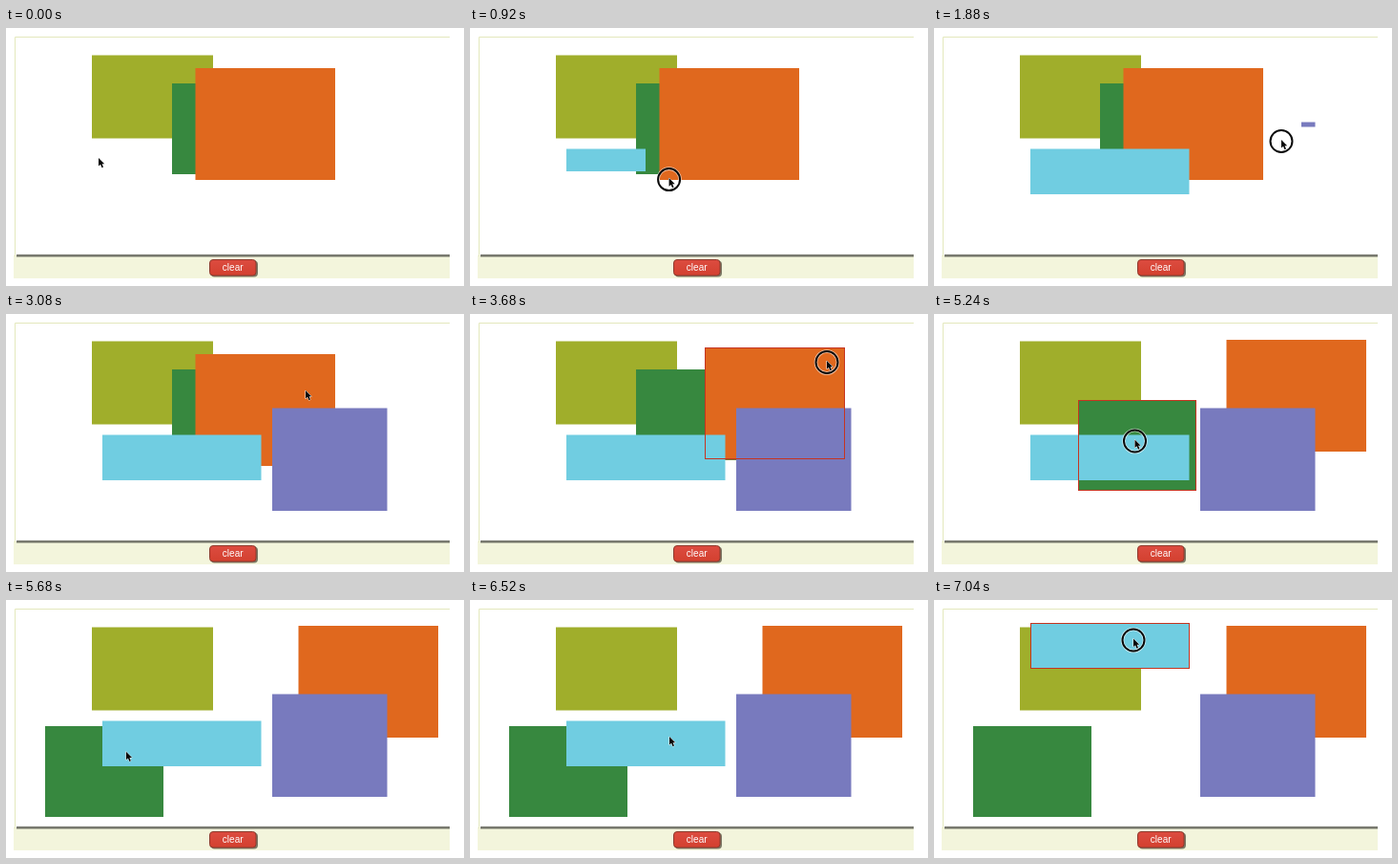
Write an HTML page that moves like this. It is 480 px wide and 270 px high and loops after 7.6 s.

```html
<!DOCTYPE html>
<html lang="en">
<head>
<meta charset="utf-8">
<title>Drawing boxes</title>
<style>
  html, body { margin: 0; width: 100%; height: 100%; overflow: hidden; background: #fff; }
  svg { display: block; width: 480px; height: 270px; }
  text { font: 10px "Liberation Sans", Arial, sans-serif; fill: #fff; text-anchor: middle; }
</style>
</head>
<body>
<svg viewBox="0 0 480 270">
  <defs>
    <linearGradient id="edge" x2="0" y2="1">
      <stop offset="0" stop-color="#b5b6ac"/>
      <stop offset=".4" stop-color="#55564e"/>
      <stop offset="1" stop-color="#d5d7c0"/>
    </linearGradient>
    <linearGradient id="red" x2="0" y2="1">
      <stop offset="0" stop-color="#dc4c40"/>
      <stop offset="1" stop-color="#d3402f"/>
    </linearGradient>
  </defs>

  <rect x="8" y="238" width="457" height="24" fill="#f3f5dc"/>
  <path d="M9.5 239V9.5H465" fill="none" stroke="#e3e8bd"/>
  <rect x="11" y="236.8" width="454" height="3.2" fill="url(#edge)"/>

  <rect x="214.5" y="243.5" width="49.5" height="17" rx="4" fill="#55503f" opacity=".75"/>
  <rect x="213.5" y="242.5" width="48.5" height="16.5" rx="3.5" fill="url(#red)" stroke="#8c3a2d"/>
  <text x="237.7" y="254">clear</text>

  <g id="boxes"></g>
  <rect id="outline" fill="none" stroke="#c53420"/>
  <g id="pointer">
    <g id="ring" fill="none">
      <circle cy="1.5" r="11.5" stroke="#fff" stroke-width="3.6" opacity=".6"/>
      <circle cy="1.5" r="11.5" stroke="#0a0a0a" stroke-width="2"/>
    </g>
    <path d="M0 0V8.6L2 6.8L3.5 10.2L5 9.5L3.6 6.2H6.2Z" fill="#080808"
      stroke="#fff" stroke-width="1" paint-order="stroke"/>
  </g>
</svg>
<script>
const LOOP = 7600, STEP = 40, LAG = 40;

// Back to front: x, y, width, height, colour
const boxes = {
  olive:  [90, 28.5, 127, 87, '#a0ae2b'],
  green:  [174, 58, 124, 95, '#37883f'],
  orange: [198.5, 42, 146.5, 117, '#e0681e'],
  cyan:   [101, 126.5, 166.5, 47.5, '#70cde1'],
  purple: [279, 98.5, 120.5, 107.5, '#787abe']
};

// Pointer path: time, x, y, easing into this point
const path = [
  [0, 97, 136], [520, 97, 136], [640, 101, 126], [680, 101, 126],
  [1080, 267, 174], [1360, 267, 174], [1680, 399, 99], [1760, 399, 99],
  [1840, 385, 103.5, 'in'], [1880, 364, 117, 'line'], [2240, 279, 206, 'out'],
  [2560, 279, 206], [3080, 314, 80, 'out'], [3280, 309, 58], [3400, 309, 58],
  [3680, 374, 49, 'in'], [4120, 405.5, 44.5, 'out'], [4280, 417, 43],
  [4600, 417, 43], [4960, 256, 85], [5080, 256, 85],
  [5200, 233, 117, 'in'], [5280, 188, 146, 'line'], [5480, 123, 159, 'out'],
  [5640, 123, 159], [5960, 190, 153], [6120, 190, 153], [6480, 209, 143],
  [6640, 209, 143], [6840, 209, 52], [7000, 209, 40.5, 'out'], [LOOP, 209, 40.5]
];

const draws = [
  { name: 'cyan', down: 640, up: 1120, fromX: 0 },
  { name: 'purple', down: 1720, up: 2480, fromX: 1 }
];

// Each drag ends at an exact offset
const drags = [
  { name: 'orange', down: 3320, up: 4600, dx: 108, dy: -15 },
  { name: 'green', down: 5000, up: 5600, dx: -133, dy: 74 },
  { name: 'cyan', down: 6600, up: LOOP, dx: 0, dy: -102.5 }
];

const ease = {
  line: u => u,
  in: u => u * u,
  out: u => u * (2 - u),
  both: u => u * u * (3 - 2 * u)
};

function pointerAt(t) {
  const i = Math.max(1, path.findIndex(p => p[0] >= t));
  const [t0, x0, y0] = path[i - 1];
  const [t1, x1, y1, kind = 'both'] = path[i];
  const u = ease[kind]((t - t0) / (t1 - t0));
  return [x0 + (x1 - x0) * u, y0 + (y1 - y0) * u];
}

const $ = id => document.getElementById(id);
const nodes = {};
for (const [name, box] of Object.entries(boxes)) {
  const node = document.createElementNS('http://www.w3.org/2000/svg', 'rect');
  node.setAttribute('fill', box[4]);
  nodes[name] = $('boxes').appendChild(node);
}

function place(node, x, y, w, h) {
  Object.entries({ x, y, width: Math.max(0, w), height: Math.max(0, h) })
    .forEach(([key, value]) => node.setAttribute(key, value));
}

const show = (node, on) => node.setAttribute('visibility', on ? 'visible' : 'hidden');
const held = t => a => t >= a.down && t < a.up;

// Grow a box from its pressed corner towards the pointer
function grow(box, draw, t) {
  const [x, y, w, h] = box;
  if (t >= draw.up) return;
  const [px, py] = pointerAt(Math.max(draw.down, t - LAG));
  const right = x + w;
  const reach = draw.fromX ? right - px : px - x;
  box[2] = t <= draw.down ? 0 : Math.min(w, reach);
  box[3] = Math.min(h, py - y);
  if (draw.fromX) box[0] = right - box[2];
}

function shift(box, drag, t) {
  if (t < drag.down) return;
  const [ax, ay] = pointerAt(drag.down);
  const [bx, by] = pointerAt(Math.min(drag.up - STEP, Math.max(drag.down, t - LAG)));
  const [ex, ey] = pointerAt(drag.up - STEP);
  const part = (now, from, to, size) => to === from ? 0 : (now - from) / (to - from) * size;
  box[0] += part(bx, ax, ex, drag.dx);
  box[1] += part(by, ay, ey, drag.dy);
}

function render(t) {
  const now = {};
  for (const name in boxes) now[name] = boxes[name].slice(0, 4);
  draws.forEach(d => grow(now[d.name], d, t));
  drags.forEach(d => shift(now[d.name], d, t));
  for (const name in now) place(nodes[name], ...now[name]);

  const active = drags.find(held(t));
  show($('outline'), active);
  if (active) {
    const [x, y, w, h] = now[active.name].map(Math.round);
    place($('outline'), x + .5, y + .5, w - 1, h - 1);
  }

  const [px, py] = pointerAt(t);
  $('pointer').setAttribute('transform', `translate(${px} ${py})`);
  show($('ring'), active || draws.some(held(t)));
}

const start = performance.now();
function tick() {
  const t = (performance.now() - start) % LOOP;
  render(Math.floor(t / STEP) * STEP);
  requestAnimationFrame(tick);
}
tick();
</script>
</body>
</html>
```
